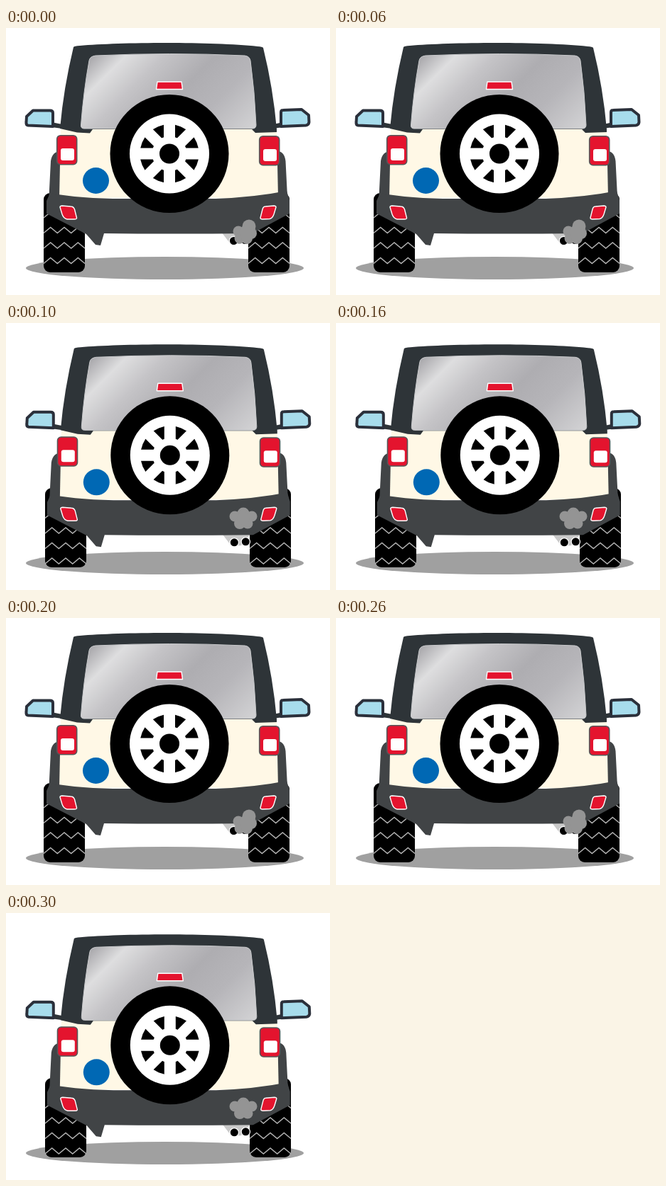
These frames come from a looping animation (456x377 px, 400 ms). An HTML page:

```html
<!DOCTYPE html>
<html lang="en">
<head>
<meta charset="utf-8">
<title>Idling car</title>
<style>
  html, body { margin: 0; width: 100%; height: 100%; overflow: hidden; background: #fff; }
  svg { display: block; width: 456px; height: 377px; }
  .dark { fill: #2e3438; }
  .grey { fill: #414446; }
  .red { fill: #e4142e; }
  .glass { fill: #a7dcec; stroke: #2b303b; stroke-width: 4; stroke-linejoin: round; }
  .lamp { fill: #e4142e; stroke: #fff; stroke-width: 1.4; stroke-linejoin: round; }
  .tread { fill: none; stroke: #b4b4b4; stroke-width: 1.4; }
</style>
</head>
<body>
<svg viewBox="0 0 456 377">
  <defs>
    <linearGradient id="pane" gradientUnits="userSpaceOnUse" x1="79" y1="79" x2="245" y2="245">
      <stop offset="0" stop-color="#a6a5a9"/>
      <stop offset=".15" stop-color="#dededf"/>
      <stop offset=".32" stop-color="#c4c3c6"/>
      <stop offset=".53" stop-color="#aeadb1"/>
      <stop offset=".73" stop-color="#b6b5b9"/>
      <stop offset="1" stop-color="#d2d2d4"/>
    </linearGradient>
    <g id="tyre">
      <rect y="233" width="58" height="112" rx="9"/>
      <g id="treads" class="tread"></g>
    </g>
    <g id="tailLamp">
      <rect class="red" x=".7" y=".7" width="28" height="41" rx="5" stroke="#55585a" stroke-width="1.6"/>
      <rect x="6" y="19" width="19" height="17" rx="3" fill="#fff"/>
    </g>
  </defs>

  <ellipse cx="223.5" cy="339" rx="195.5" ry="16" fill="#a0a0a0"/>
  <g id="tyres">
    <use href="#tyre" x="53"/>
    <use href="#tyre" x="341"/>
  </g>

  <g id="car">
    <path fill="#c9c9c9" d="M303 288 L316 305 H330 L344 288Z"/>
    <g stroke="#fff" stroke-width="1.3">
      <circle cx="320.5" cy="300.5" r="6.2"/>
      <circle cx="336.5" cy="299.5" r="6.2"/>
    </g>
    <path class="dark" d="M64 133 L79 136 V142 L64 140Z M390 133 L376 136 V142 L390 140Z"/>
    <path class="glass" d="M38 116.5 H62 Q66 116.5 66 120 V139 L31 137.5 Q28 137 28.500 133 L29 125Z"/>
    <path class="glass" d="M390 116 L416 115 L426 123 L426.500 133 Q426 137 422 137.500 L387 139 V119 Q387 116 390 116Z"/>

    <path class="grey" d="M77 174 Q65 174 63 188 L60.500 238 H82 V174Z M383 174 Q392 175 393.500 188 L396 238 H376 V174Z"/>
    <path fill="#fff8e6" d="M77 143 H381 L383 240 H75Z"/>
    <path class="dark" d="M95 27 Q96 25.500 104 25 C160 20 290 19 354 26 Q361 26.500 362 28 Q376 85 381 143 V147 L351 148 L346 143 H122 L118 148.500 L100 147.500 L76 142 Q81 85 95 27Z"/>
    <path fill="url(#pane)" stroke="#c9cacc" d="M117 46 Q118 40 126 39 Q230 34 336 39 Q343 40 344 46 Q350 90 352 137 Q352 142 347 142 H110 Q105 142 105.500 137 Q109 90 117 46Z"/>
    <path class="lamp" stroke-width=".8" d="M213 76 H247 L248.500 86.500 H211.500Z"/>
    <use href="#tailLamp" x="71" y="151"/>
    <use href="#tailLamp" x="356" y="152"/>
    <circle cx="126.500" cy="215.500" r="18.500" fill="#0068b4"/>

    <path class="grey" d="M62 233 Q105 241 165 241 H295 Q350 239 395 230 L399 243 V262 L347 290 Q230 291 138 290 L133 307 L126 306 L113 291 L57 262 V244Z"/>
    <path class="lamp" d="M76 253 Q76 251 79 251 L91 252 Q95 252 96.500 256 L99.500 268 Q100 270 96 270 L86 270 Q81 269 79 263Z"/>
    <path class="lamp" d="M380 253 Q380 251 377 251 L365 252 Q362 252 361 256 L358 268 Q358 270 361 270 L371 269.500 Q375 269 377 263Z"/>

    <g transform="translate(230 177.500)">
      <circle r="83.500"/>
      <circle r="56" fill="#fff"/>
      <circle r="41.500"/>
      <g id="spokes" stroke="#fff" stroke-width="16"></g>
      <circle r="24.500" fill="#fff"/>
      <circle r="14"/>
    </g>
  </g>
  <g id="smoke" fill="#949494"></g>
</svg>
<script>
  const STEP = 100;
  const el = id => document.getElementById(id);

  const zigzag = y => `M0 ${y + 8}` + [1, 2, 3, 4, 5, 6]
    .map(i => `L${(i * 58 / 6).toFixed(1)} ${y + (i + 1) % 2 * 8}`).join('');
  el('treads').innerHTML = [260, 281.5, 303, 324.5]
    .map(y => `<path d="${zigzag(y)}"/>`).join('');
  el('spokes').innerHTML = [0, 45, 90, 135]
    .map(a => `<path d="M-43 0H43" transform="rotate(${a})"/>`).join('');

  // Each puff is a cluster of [x, y, radius] circles.
  const poses = [
    { car: [0, 0], tyres: 0, tread: 0,
      puffs: [[342, 280, 9.5], [327, 287, 7.5], [345, 290, 8], [329, 297, 7.5], [339, 297, 8], [337, 288, 9]] },
    { car: [0.8, 9.3], tyres: 2, tread: 7.5,
      puffs: [[334, 269, 8.5], [346, 273, 7.5], [322, 273, 7.5], [329, 283, 8], [340, 283, 7.5], [334, 276, 9]] }
  ];

  let shown = -1;
  function draw(now) {
    const index = Math.floor(now / STEP) % poses.length;
    if (index !== shown) {
      const pose = poses[index];
      el('car').setAttribute('transform', `translate(${pose.car})`);
      el('tyres').setAttribute('transform', `translate(${pose.tyres})`);
      el('treads').setAttribute('transform', `translate(0 ${pose.tread})`);
      el('smoke').innerHTML = pose.puffs
        .map(([x, y, r]) => `<circle cx="${x}" cy="${y}" r="${r}"/>`).join('');
      shown = index;
    }
  }

  const start = performance.now();
  function tick() {
    draw(performance.now() - start);
    requestAnimationFrame(tick);
  }
  tick();
</script>
</body>
</html>
```
